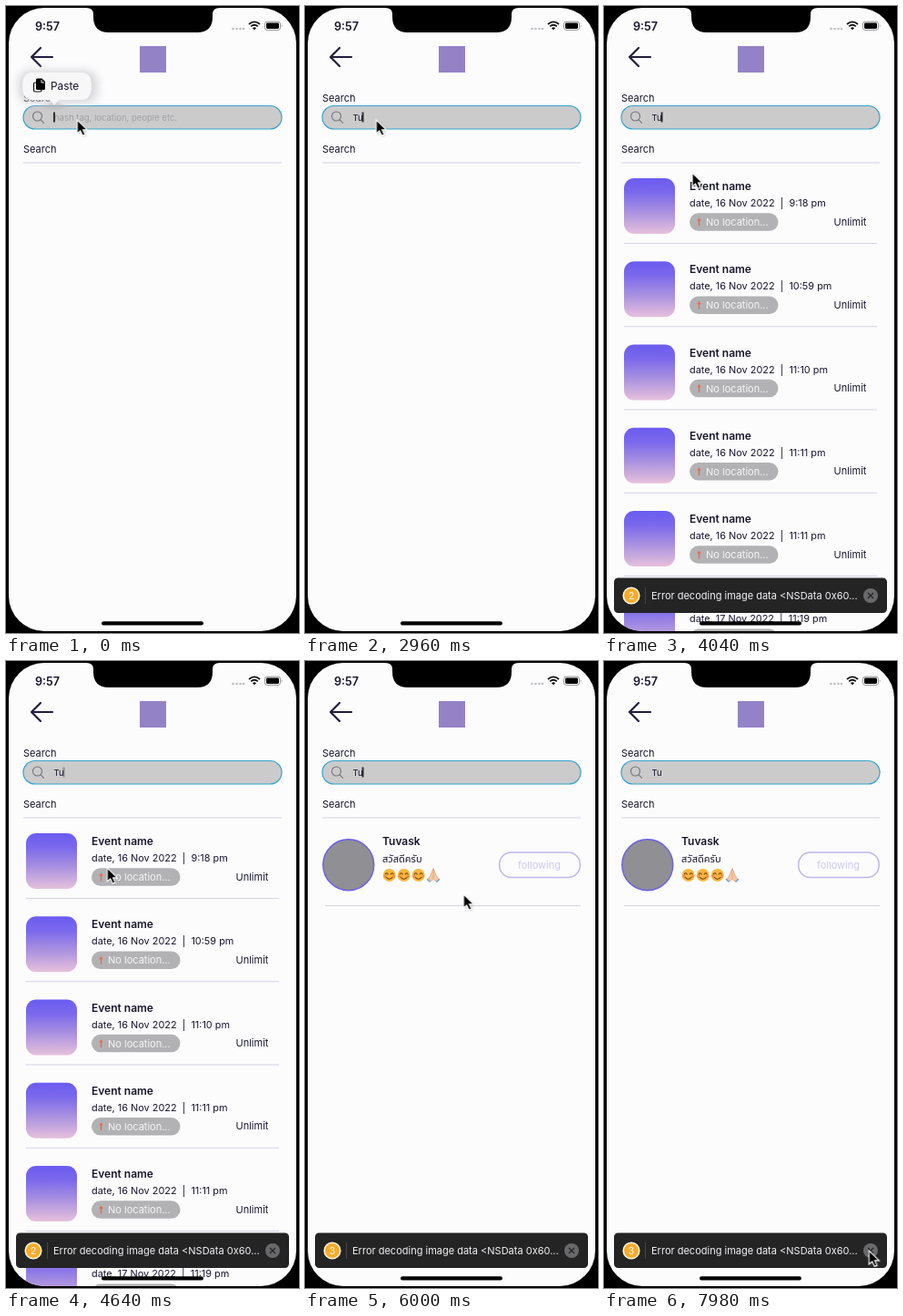
Recreate the animation shown at these times as an HTML page. Size 322 by 688 pixels, loop 8 s.

```html
<!DOCTYPE html>
<html lang="en">
<head>
<meta charset="utf-8">
<title>Search screen</title>
<style>
html, body { margin: 0; width: 100%; height: 100%; overflow: hidden; background: #000; }
svg { display: block; width: 100%; height: 100%; }
text { font: 11px Inter, Roboto, sans-serif; fill: #17152a; white-space: pre; }
.bold { font-weight: 600; font-size: 12px; }
.date { font-size: 10.9px; }
.field { font-size: 9.5px; }
.thai { font-family: "Noto Sans Thai", "Noto Sans", sans-serif; }
.line { stroke: #d4d2e2; stroke-width: 1; }
.toast text { fill: #f2f2f4; }
</style>
</head>
<body>
<svg viewBox="0 0 322 688" preserveAspectRatio="none">
  <defs>
    <clipPath id="screen"><rect x="3" y="2" width="316" height="684" rx="39"/></clipPath>
    <linearGradient id="thumb" x2="0" y2="1">
      <stop offset="0" stop-color="#6b5cf0"/>
      <stop offset=".25" stop-color="#7a68ec"/>
      <stop offset=".6" stop-color="#a890e0"/>
      <stop offset="1" stop-color="#e6c0dc"/>
    </linearGradient>
    <filter id="glow" x="-40%" y="-80%" width="180%" height="260%"><feGaussianBlur stdDeviation="5"/></filter>
    <filter id="soft" x="-50%" y="-50%" width="200%" height="200%"><feGaussianBlur stdDeviation="1.2"/></filter>
    <g id="smile">
      <circle r="7" fill="#fbb63c"/>
      <path d="M-4.5-1q1.5-2.4 3 0M1.5-1q1.5-2.4 3 0M-3.8 2q3.8 4.6 7.6 0" fill="none" stroke="#6c4212" stroke-width="1.1" stroke-linecap="round"/>
      <circle cx="-4.6" cy="1.2" r="1.5" fill="#f48a4c"/>
      <circle cx="4.6" cy="1.2" r="1.5" fill="#f48a4c"/>
    </g>
    <path id="arrow" d="M0 0V15L3.5 11.9L6 17.3L8.7 16.1L6.3 10.9H11Z"/>
  </defs>

  <rect width="322" height="688"/>
  <g clip-path="url(#screen)">
    <rect width="322" height="688" fill="#fcfcfd"/>

    <path d="M51 56H28M38 46L28 56L38 66" fill="none" stroke="#211d3c" stroke-width="2.2" stroke-linecap="round" stroke-linejoin="round"/>
    <rect x="147" y="44" width="29" height="29" fill="#9482c6"/>

    <text x="19" y="105">Search</text>
    <rect x="19" y="109.5" width="284" height="25.5" rx="12.75" fill="#cbcbcc" stroke="#35a3cc" stroke-width="1.2"/>
    <g fill="none" stroke="#75757a" stroke-width="1.1" stroke-linecap="round">
      <circle cx="34.5" cy="121" r="5"/><path d="M38.2 124.8L41.5 128.3"/>
    </g>
    <text id="hint" class="field" x="53" y="125.5" style="fill:#a0a0a4">hash tag, location, people etc.</text>
    <text id="typedT" class="field" x="52.5" y="125.5">T</text>
    <text id="typedU" class="field" x="52.5" y="125.5">Tu</text>
    <g id="caret"><rect id="caretBar" x="52.2" y="116.5" width="1.5" height="11"/></g>

    <text x="19" y="161">Search</text>
    <path class="line" d="M19 172H303"/>

    <g id="events"></g>

    <g id="person">
      <circle cx="47.8" cy="223.7" r="28" fill="#908f93" stroke="#6c5eea" stroke-width="1.4"/>
      <text class="bold" x="85" y="202">Tuvask</text>
      <text class="thai" x="85" y="220.5">สวัสดีครับ</text>
      <use href="#smile" x="92.7" y="235"/>
      <use href="#smile" x="108.7" y="235"/>
      <use href="#smile" x="124.7" y="235"/>
      <path d="M141 227.5L137.5 236L135 239.5L137.8 242L141 239.5L144.2 242L147 239.5L144.5 236Z" fill="#f5c9a4" stroke="#d49c75" stroke-width=".7"/>
      <path d="M141 229V239" stroke="#d49c75" stroke-width=".7"/>
      <path d="M134 239.2L137.5 242.5M148 239.2L144.5 242.5" stroke="#6aa6d8" stroke-width="1.5"/>
      <rect x="213.7" y="210" width="88.5" height="27.5" rx="13" fill="none" stroke="#bdb7ec" stroke-width="1.5"/>
      <text x="234" y="228" style="fill:#cdc9ee">following</text>
      <path class="line" d="M22 268.5H303"/>
    </g>

    <g id="toast" class="toast">
      <rect x="11" y="627.5" width="300" height="38.5" rx="4.5" fill="#242425"/>
      <path d="M45.5 638V656" stroke="#444446"/>
      <circle cx="30" cy="647" r="8.8" fill="#f5ac2c" stroke="#fff6e2" stroke-width="1.6"/>
      <g id="notes"></g>
      <circle cx="293" cy="647" r="8" fill="#69696b"/>
      <path d="M290 644L296 650M296 644L290 650" stroke="#242425" stroke-width="1.3"/>
    </g>

    <g id="paste">
      <rect x="14" y="71" width="86" height="35" rx="12" fill="#cfcfd2" opacity=".85" filter="url(#glow)"/>
      <path d="M37 110Q49 108 53 103Q57 108 69 110Q53 117 37 110Z" fill="#b6b6ba" opacity=".6" filter="url(#soft)"/>
      <path d="M29 73H83Q94 73 94 87.5Q94 103 83 103H58L53 109L48 103H29Q18 103 18 88Q18 73 29 73Z" fill="#f7f7f8"/>
      <rect x="30.5" y="84" width="8.5" height="10" rx="1.5" fill="none" stroke="#111" stroke-width="1.2"/>
      <path d="M34.5 79.5H39.5L43 83V90.5Q43 92 41.5 92H34.5Q33 92 33 90.5V81Q33 79.5 34.5 79.5Z"/>
      <path d="M39 81V84H42" fill="none" stroke="#f7f7f8"/>
      <text x="49" y="91.5" style="font-size:11.8px">Paste</text>
    </g>

    <rect x="105" y="675.3" width="112" height="4.2" rx="2.1"/>
  </g>

  <path d="M88 0H235V2Q227 2 227 9V12Q227 29 210 29H113Q96 29 96 12V9Q96 2 88 2Z"/>
  <text x="32" y="26.5" style="font-size:12.6px;font-weight:600">9:57</text>
  <g id="signal" fill="#bebec2"></g>
  <g fill="none" stroke="#111" stroke-width="1.8">
    <path d="M267 20Q273 14.8 279 20M269.2 22.4Q273 19.2 276.8 22.4"/>
    <path d="M271.3 24.2L273 26L274.7 24.2Q273 23 271.3 24.2Z" fill="#111" stroke-width=".6"/>
  </g>
  <rect x="284.5" y="17.2" width="17" height="9.2" rx="2.6" fill="none" stroke="#8a8a8e" stroke-width=".9"/>
  <rect x="286" y="18.6" width="14" height="6.4" rx="1.4"/>
  <path d="M302.8 20.2Q304.6 21.8 302.8 23.4Z" fill="#8a8a8e"/>

  <g id="cursor">
    <use href="#arrow" x="1" y="1" fill="#8a8a8e" opacity=".6" filter="url(#soft)"/>
    <use href="#arrow" stroke="#fff" stroke-width="1.1"/>
  </g>
</svg>
<script>
const LOOP = 8000;
const byId = id => document.getElementById(id);

const eventRow = ([day, time], i) => `
  <g transform="translate(0 ${(i * 91.25).toFixed(2)})">
    <rect x="22" y="189" width="56" height="61" rx="11" fill="url(#thumb)"/>
    <text class="bold" x="94" y="202">Event name</text>
    <text class="date" x="94" y="220">date, ${day} Nov 2022  |  ${time} pm</text>
    <rect x="94" y="227.3" width="97.5" height="19.5" rx="9.75" fill="#b2b2b4"/>
    <path d="M104.5 234V241.5M103 235.8L104.5 233.6L106 235.8" fill="none" stroke="#e46a54" stroke-width="1.3"/>
    <text x="112" y="241" style="fill:#f6f6f8">No location...</text>
    <text x="252.5" y="240.5">Unlimit</text>
    <path class="line" d="M22 260.5H300"/>
  </g>`;
byId('events').innerHTML =
  [[16, '9:18'], [16, '10:59'], [16, '11:10'], [16, '11:11'], [16, '11:11'], [17, '11:19']].map(eventRow).join('');

const decodeError = 'Error decoding image data &lt;NSData 0x60...';
byId('notes').innerHTML =
  [['!', 'Please pass alt prop to Image component'], ['2', decodeError], ['3', decodeError]]
    .map(([badge, message], i) => `<g id="note${i}">
      <text x="30" y="651" text-anchor="middle">${badge}</text>
      <text x="52" y="651">${message}</text></g>`).join('');

byId('signal').innerHTML =
  [249.5, 253.5, 257.5, 261].map(x => `<circle cx="${x}" cy="25" r="1.3"/>`).join('');

// Steps are [time, value]; the last value holds to the end of the loop.
function play(id, prop, steps, easing = 'linear') {
  const last = steps[steps.length - 1][1];
  const frames = [...steps, [LOOP, last]].map(([time, value]) =>
    ({ offset: time / LOOP, [prop]: value, easing }));
  byId(id).animate(frames, { duration: LOOP, iterations: Infinity });
}

const hold = 'steps(1, end)';
const at = (x, y) => `translate(${x}px, ${y}px)`;

function showBetween(id, from, to = LOOP) {
  const steps = [[0, from ? 0 : 1]];
  if (from) steps.push([from, 1]);
  if (to < LOOP) steps.push([to, 0]);
  play(id, 'opacity', steps, hold);
}

const TYPE_T = 1040, TYPE_U = 1700, RESULTS = 3060, SECOND_NOTE = 3500, PEOPLE = 5300;

showBetween('hint', 0, TYPE_T);
play('typedT', 'opacity', [[0, 0], [TYPE_T, 0], [1180, 1], [TYPE_U, 1], [TYPE_U + 1, 0]]);
showBetween('typedU', TYPE_U);
play('caretBar', 'transform', [[0, at(0, 0)], [TYPE_T, at(5.8, 0)], [TYPE_U, at(10.6, 0)]], hold);

const blink = [[0, 1]];
for (let t = 2460; t < LOOP; t += 900) {
  blink.push([t, 1], [t + 80, 0], [t + 340, 0], [t + 440, 1]);
}
play('caret', 'opacity', blink.filter(([t]) => t < LOOP));

play('paste', 'opacity', [[0, 1], [560, 1], [820, 0]]);
showBetween('events', RESULTS, PEOPLE);
showBetween('person', PEOPLE);
showBetween('toast', RESULTS);
showBetween('note0', RESULTS, SECOND_NOTE);
showBetween('note1', SECOND_NOTE, PEOPLE);
showBetween('note2', PEOPLE);

play('cursor', 'transform', [
  [0, at(78.3, 125)], [3500, at(78.3, 125)], [4500, at(111.3, 227)],
  [4700, at(111.3, 227)], [5900, at(174.3, 256)], [6100, at(174.3, 256)], [7400, at(291.3, 647)]
], 'ease-in-out');
</script>
</body>
</html>
```
